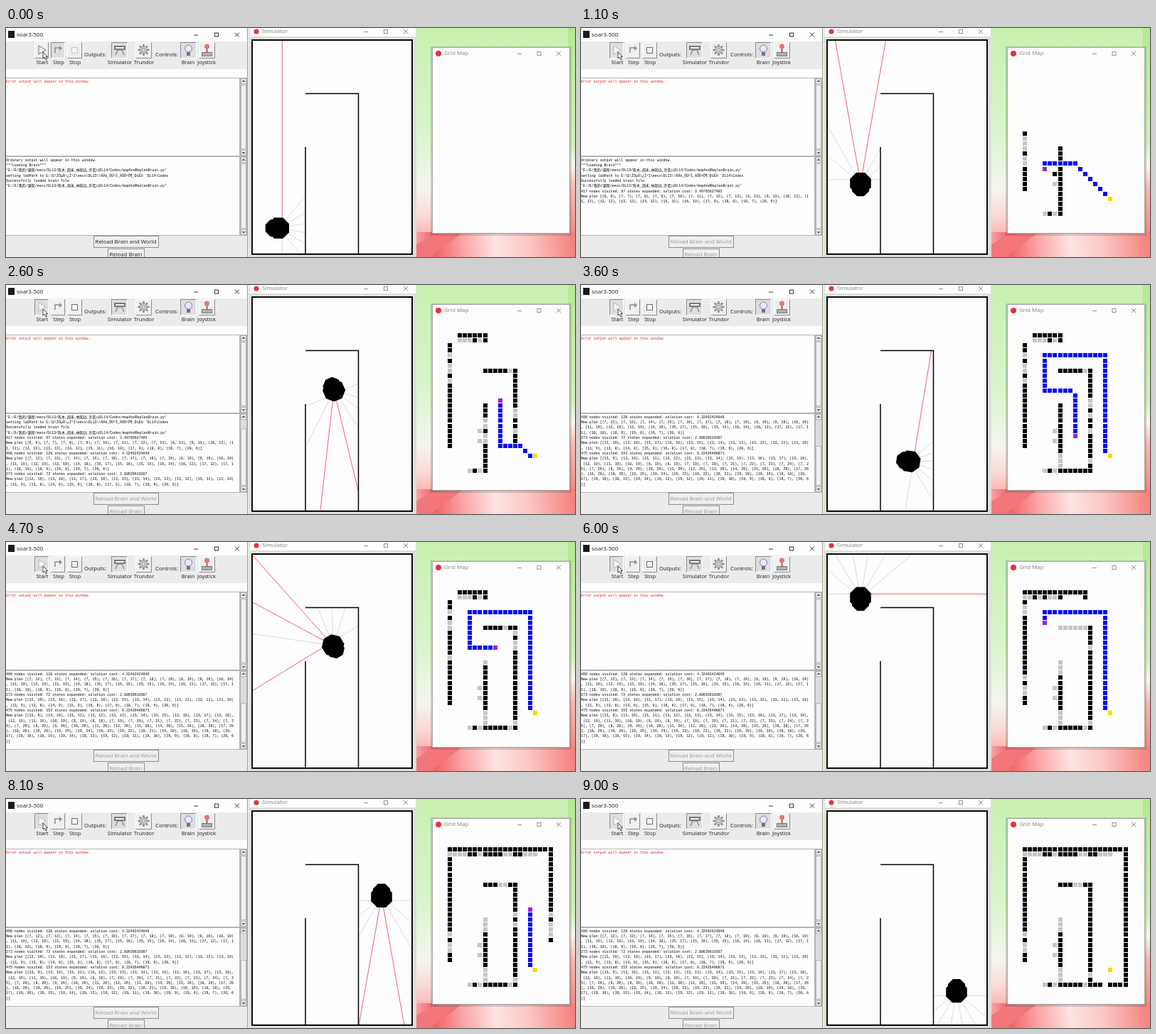
An HTML page with a canvas for the animation above (9100 ms loop, 800x323 px).

```html
<!DOCTYPE html>
<html lang="en">
<head>
<meta charset="utf-8">
<title>Robot map and replan</title>
<style>
html, body { margin: 0; width: 100%; height: 100%; overflow: hidden; background: #fdfdfd; }
canvas { display: block; width: 800px; height: 323px; }
</style>
</head>
<body>
<canvas id="stage" width="800" height="323"></canvas>
<script>
const LOOP = 9100, STEP = 100;
const ctx = document.getElementById('stage').getContext('2d');
const UI = '"Open Sans", "Noto Sans", sans-serif';
const MONO = '"Liberation Mono", "Noto Sans CJK SC", "Noto Sans CJK", monospace';
const PAPER = '#fdfdfd', PANEL = '#ebebeb', INK = '#1a1a1a', EDGE = '#b4b4b4', SOFT = '#8c8c90';
const RAD = Math.PI / 180;
const clamp = v => Math.min(1, Math.max(0, v));

// Drawing helpers
function box(x, y, w, h, fill, stroke) {
  if (fill) { ctx.fillStyle = fill; ctx.fillRect(x, y, w, h); }
  if (stroke) { ctx.lineWidth = 1; ctx.strokeStyle = stroke; ctx.strokeRect(x + .5, y + .5, w - 1, h - 1); }
}
function line(points, color, width = 1, fill) {
  ctx.beginPath();
  for (let i = 0; i < points.length; i += 2) ctx.lineTo(points[i], points[i + 1]);
  if (fill) { ctx.closePath(); ctx.fillStyle = fill; ctx.fill(); }
  if (color) { ctx.strokeStyle = color; ctx.lineWidth = width; ctx.stroke(); }
}
function disc(x, y, r, fill, stroke) {
  ctx.beginPath();
  ctx.arc(x, y, r, 0, 7);
  if (fill) { ctx.fillStyle = fill; ctx.fill(); }
  if (stroke) { ctx.strokeStyle = stroke; ctx.lineWidth = 1; ctx.stroke(); }
}
function text(s, x, y, size, color = INK, align = 'left', family = UI) {
  ctx.font = `${size}px ${family}`;
  ctx.textAlign = align;
  ctx.textBaseline = 'middle';
  ctx.fillStyle = color;
  ctx.fillText(s, x, y);
}
function windowButtons(x, y, gap, color) {
  line([x - 3, y + .5, x + 3, y + .5], color);
  box(x + gap - 3, y - 3, 6, 6, null, color);
  const c = x + 2 * gap;
  line([c - 3, y - 3, c + 3, y + 3], color);
  line([c + 3, y - 3, c - 3, y + 3], color);
}

// Plans: corner cells expanded to unit steps; the robot replans after `upto` steps
function expand(corners) {
  const cells = [corners[0]];
  for (const [c, r] of corners.slice(1)) {
    let [x, y] = cells[cells.length - 1];
    while (x !== c || y !== r) {
      x += Math.sign(c - x);
      y += Math.sign(r - y);
      cells.push([x, y]);
    }
  }
  return cells;
}
const PLANS = [
  { upto: 6, stats: [417, 97, '3.49705627485'],
    cells: expand([[6, 6], [7, 7], [7, 13], [13, 13], [20, 6]]) },
  { upto: 12, stats: [498, 128, '4.32492424049'],
    cells: expand([[7, 12], [7, 19], [13, 19], [15, 17], [15, 15], [16, 14], [16, 13], [17, 12],
      [17, 11], [18, 10], [18, 9], [19, 8], [19, 7], [20, 6]]) },
  { upto: 10, stats: [273, 72, '2.88639610307'],
    cells: expand([[12, 19], [13, 18], [13, 8], [17, 8], [19, 6], [20, 6]]) },
  { upto: 53, stats: [475, 153, '8.22426406871'],
    cells: expand([[13, 9], [13, 18], [12, 19], [7, 19], [7, 26], [19, 26], [19, 7], [20, 6]]) }
];

// Each leg turns on the spot, then drives one cell
const START = 390, DRIVE = 67.6, TURN = DRIVE / 18;
const legs = [];
let clock = START, heading = 90;
for (const plan of PLANS) {
  plan.at = clock;
  for (let next = 1; next <= plan.upto; next++) {
    const a = plan.cells[next - 1], b = plan.cells[next];
    const aim = Math.atan2(b[0] - a[0], b[1] - a[1]) / RAD;
    const turn = ((aim - heading) % 360 + 540) % 360 - 180;
    const turnTime = Math.abs(turn) * TURN;
    legs.push({ at: clock, a, b, heading, turn, turnTime, plan, next });
    clock += turnTime + DRIVE;
    heading += turn;
  }
}
const ARRIVAL = clock;

function legAt(t) {
  return legs.filter(l => l.at <= t).pop() || legs[0];
}

// Grid and simulator coordinates
const CELL = 11.25, X0 = 348, Y0 = 316;
const toX = c => X0 + (c - 3) * CELL, toY = r => Y0 - (r - 3) * CELL;
const toCol = x => Math.round(3 + (x - X0) / CELL), toRow = y => Math.round(3 + (Y0 - y) / CELL);

function poseAt(t) {
  const { at, a, b, heading, turn, turnTime } = legAt(t);
  const spun = turnTime ? clamp((t - at) / turnTime) : 1;
  const gone = clamp((t - at - turnTime) / DRIVE);
  return {
    x: toX(a[0] + (b[0] - a[0]) * gone),
    y: toY(a[1] + (b[1] - a[1]) * gone),
    deg: heading + turn * spun
  };
}

// Sonar
const WALLS = [
  [346, 17.5, 571, 17.5], [571, 17.5, 571, 319], [346, 319, 571, 319], [346, 17.5, 346, 319],
  [422, 92.5, 495.5, 92.5], [495.5, 92.5, 495.5, 319], [422, 168, 422, 319]
];
const SONAR = [-90, -50, -30, -10, 10, 30, 50, 90];
const RANGE = 122;

function castRay(x, y, dx, dy) {
  let best = 400;
  for (const [x1, y1, x2, y2] of WALLS) {
    const ex = x2 - x1, ey = y2 - y1, det = dx * ey - dy * ex;
    if (Math.abs(det) < 1e-6) continue;
    const d = ((x1 - x) * ey - (y1 - y) * ex) / det;
    const u = ((x1 - x) * dy - (y1 - y) * dx) / det;
    if (d > 0 && u >= 0 && u <= 1) best = Math.min(best, d);
  }
  return best;
}
function sonarRays({ x, y, deg }) {
  return SONAR.map(s => {
    const ahead = Math.abs(s) === 90 ? 6.5 : 1.5;
    const ox = x + ahead * Math.sin(deg * RAD), oy = y - ahead * Math.cos(deg * RAD);
    const dx = Math.sin((deg + s) * RAD), dy = -Math.cos((deg + s) * RAD);
    return { ox, oy, dx, dy, d: castRay(ox, oy, dx, dy) };
  });
}

// Map building: an echo marks its cell, cells the beam crosses are cleared
const BLOCKED = '#000', CLEARED = '#c6c6c6';
let seed = 7;
function random() {
  seed = (seed * 16807) % 2147483647;
  return seed / 2147483647;
}
function scan(grid, t) {
  for (const { ox, oy, dx, dy, d } of sonarRays(poseAt(t))) {
    if (d > RANGE) continue;
    const reach = d + (random() - .5) * .16 * CELL;
    const key = s => `${toCol(ox + dx * s)},${toRow(oy + dy * s)}`;
    for (let s = reach - .1 * CELL; s > 0; s -= CELL / 4) {
      if (grid.has(key(s))) grid.set(key(s), CLEARED);
    }
    grid.set(key(reach), BLOCKED);
  }
}
const history = [];
const grid = new Map();
for (let t = 0; t < LOOP; t += 25) {
  if (t >= STEP) scan(grid, t);
  if (t % STEP === 0) history.push(new Map(grid));
}

function cell(c, r, color) {
  box(Math.round(602.7 + c * 7.08 - 3), Math.round(283.5 - r * 7.08 - 3), 6, 6, color);
}
function drawMap(t) {
  box(597, 26, 198, 267, 'rgba(70,70,80,.22)');
  box(599, 27, 194, 263, PAPER, '#a8a8a8');
  disc(608, 36, 4, '#e8303a');
  text('Grid Map', 616, 36, 8, '#808080');
  windowButtons(722, 36, 27.5, '#909090');
  for (const [key, color] of history[t / STEP]) cell(...key.split(','), color);
  if (t < START) return;
  if (t < ARRIVAL) {
    const { plan, next } = legAt(t);
    plan.cells.slice(next).forEach(([c, r], i) => cell(c, r, i ? '#0a0af0' : '#a41ed0'));
  }
  cell(20, 6, '#fad800');
}

function octagon(x, y, r, deg) {
  const points = [];
  for (let i = 0; i < 8; i++) {
    const a = (deg + 22.5 + i * 45) * RAD;
    points.push(x + r * Math.sin(a), y - r * Math.cos(a));
  }
  line(points, null, 0, '#000');
}
function drawRobot(t) {
  const pose = poseAt(t), { x, y, deg } = pose;
  for (const { ox, oy, dx, dy, d } of sonarRays(pose)) {
    line([ox, oy, ox + dx * d, oy + dy * d], d > RANGE ? '#f2606c' : '#d9d9e6');
  }
  const fx = Math.sin(deg * RAD), fy = -Math.cos(deg * RAD);
  octagon(x + 1.5 * fx, y + 1.5 * fy, 16, deg);
  octagon(x - 5 * fx, y - 5 * fy, 13, deg);
}

// Console
const FILE = "'E:/E/我的/课程/eecs/DL13/陈木_周禾_林知远_许若川DL14/Codes/mapAndReplanBrain.py'";
const INTRO = [
  'Ordinary output will appear in this window.', '***Loading Brain***', FILE,
  'setting labPath to E:\\E\\ÎÒµÄ\\¿Î³Ì\\eecs\\DL13\\³ÂÄ¾_ÖÜºÌ_ÁÖÖªÔ¶_ÐíÈô´¨DL14\\Codes',
  'Successfully loaded brain file', FILE
];
function consoleLines(t) {
  const out = [...INTRO];
  for (const { at, stats: [nodes, states, cost], cells } of PLANS) {
    if (t < at) break;
    out.push(`${nodes} nodes visited: ${states} states expanded: solution cost: ${cost}`);
    const list = cells.map(([c, r]) => `(${c}, ${r})`).join(', ');
    out.push(...`New plan [${list}]`.match(/.{1,108}/g));
  }
  return out;
}

function scrollbar(y, h, thumb) {
  box(329, y, 10, h, '#dcdcdc', EDGE);
  box(330, y + 10 + thumb, 8, h - 20 - thumb, '#f0f0f0', EDGE);
  for (const [cy, d] of [[y + 5, -2], [y + h - 5, 2]]) {
    box(330, cy - 4, 8, 8, '#f0f0f0', EDGE);
    line([331.5, cy - d / 2, 336.5, cy - d / 2, 334, cy + d], null, 0, '#606060');
  }
}

function toolButton(x, w, down) {
  box(x, 20, w, 23, down ? '#dedee0' : '#efefef');
  line([x + .5, 42.5, x + .5, 20.5, x + w - .5, 20.5], down ? SOFT : '#fff');
  line([x + .5, 42.5, x + w - .5, 42.5, x + w - .5, 20.5], down ? '#fff' : SOFT);
}
function drawIcons(on) {
  line([46, 25, 56, 31, 46, 37, 46, 25], on ? '#b8b8b8' : '#6c6c70', 1, '#f4f4f4');
  line([69, 35, 69, 28, 76, 28], SOFT, 1.5);
  line([75, 25, 79, 28.5, 75, 32], null, 0, SOFT);
  box(92, 27, 9, 9, '#f4f4f4', on ? '#6c6c70' : '#c4c4c4');
  box(152, 25, 16, 6, '#77777c');
  box(154, 27, 12, 2, '#f4f4f4');
  line([154, 38, 157, 31, 163, 31, 166, 38], SOFT, 1.5);
  for (let i = 0; i < 8; i++) {
    const a = i * Math.PI / 4, x = Math.cos(a), y = Math.sin(a);
    line([193.5 + 5 * x, 31 + 5 * y, 193.5 + 8 * x, 31 + 8 * y], SOFT, 2.5);
  }
  disc(193.5, 31, 5, '#cacace', SOFT);
  disc(193.5, 31, 2, PAPER, SOFT);
  disc(256.5, 29, 5, '#e4ecfa', '#74809a');
  box(254, 34, 5, 5, '#74747c');
  box(275, 34, 15, 6, '#b0aeb0', '#77777c');
  line([282.5, 35, 282.5, 28], '#94605c', 2);
  disc(282.5, 26, 3.5, '#e2786e');
}
function drawToolbar(t) {
  const on = t > 0;
  box(0, 19, 339, 39, PANEL);
  toolButton(40, 20, on);
  toolButton(63, 20, !on);
  toolButton(86, 21, false);
  toolButton(148, 23, true);
  toolButton(182, 23, false);
  toolButton(245, 23, true);
  toolButton(271, 23, false);
  drawIcons(on);
  const labels = [['Start', 51], ['Step', 74], ['Stop', 97], ['Simulator', 160], ['Trundor', 194], ['Brain', 256], ['Joystick', 282]];
  for (const [s, x] of labels) text(s, x, 49, 7.6, INK, 'center');
  text('Outputs:', 125.5, 38, 7.6, INK, 'center');
  text('Controls:', 226, 38, 7.6, INK, 'center');
  line([52, 34, 52, 43, 54, 41, 56, 45, 57.5, 44, 56, 40.5, 58.5, 40.5, 52, 34], '#222', .8, '#fff');
}

function drawMain(t) {
  box(0, 0, 342, 323, PANEL);
  box(0, 0, 339, 19, PAPER);
  box(3, 4, 9, 10, INK);
  text('soar3-500', 15, 9.5, 8);
  windowButtons(267, 9.5, 29, '#333');
  drawToolbar(t);
  box(0, 58, 339, 12, PAPER);
  box(-1, 70, 330, 111, PAPER, EDGE);
  box(-1, 181, 330, 112, PAPER, EDGE);
  text('Error output will appear in this window.', 0, 75.5, 4.95, '#f01818', 'left', MONO);
  const all = consoleLines(t);
  all.slice(-14).forEach((s, i) => text(s, 0, 186.5 + i * 7.3, 4.95, '#000', 'left', MONO));
  scrollbar(70, 111, 0);
  scrollbar(181, 112, Math.max(0, 92 * (1 - 14 / all.length)));
  const ink = t ? '#979797' : INK;
  box(123, 293, 92, 17, '#efefef', SOFT);
  text('Reload Brain and World', 168.5, 301.5, 7.8, ink, 'center');
  box(143, 311, 52, 17, '#efefef', SOFT);
  text('Reload Brain', 168.5, 319.5, 7.8, ink, 'center');
  line([339.5, 0, 339.5, 323], '#a4a48c');
}

function drawSimulator(t) {
  box(342, 0, 235, 323, '#dededa');
  box(343, 0, 233, 12, PAPER);
  disc(352, 5, 3.5, '#e8303a');
  text('Simulator', 360, 5, 8, '#808080');
  windowButtons(506, 5, 28, '#909090');
  box(345, 16, 227, 304, PAPER);
  drawRobot(t);
  ctx.lineWidth = 2;
  ctx.strokeStyle = '#0a0a0a';
  ctx.strokeRect(346, 17, 225, 302);
  line([421, 92.5, 495.5, 92.5, 495.5, 319], '#000', 1.5);
  line([421, 168, 421, 319], '#000', 1.5);
}

function gradient(x0, y0, x1, y1, stops) {
  const g = ctx.createLinearGradient(x0, y0, x1, y1);
  stops.forEach(([at, color]) => g.addColorStop(at, color));
  return g;
}
function drawBackdrop() {
  box(577, 0, 223, 323, gradient(577, 0, 577, 323,
    [[0, '#c9f0ae'], [.45, '#d9f5cc'], [.7, '#f4f6ee'], [.82, '#fbd9d6'], [1, '#f58a88']]));
  box(790, 0, 10, 323, gradient(0, 0, 0, 323,
    [[0, '#b6e890'], [.5, '#cdf2b6'], [.6, '#fbf4f0'], [.7, '#f9b8b0'], [1, '#f2706c']]));
  box(577, 288, 223, 35, gradient(577, 323, 800, 300,
    [[0, '#f6a8a8'], [.12, '#f26468'], [.3, '#f8a6a6'], [.5, '#fce4e2'], [.7, '#fbc8c6'], [1, '#f4807c']]));
  line([577, 323, 577, 305, 600, 292, 640, 290, 615, 310, 595, 323], null, 0, '#f3777a');
}

function frame(now) {
  const t = Math.floor((now % LOOP) / STEP) * STEP;
  drawBackdrop();
  drawMain(t);
  drawSimulator(t);
  drawMap(t);
  requestAnimationFrame(frame);
}
frame(performance.now());
</script>
</body>
</html>
```
